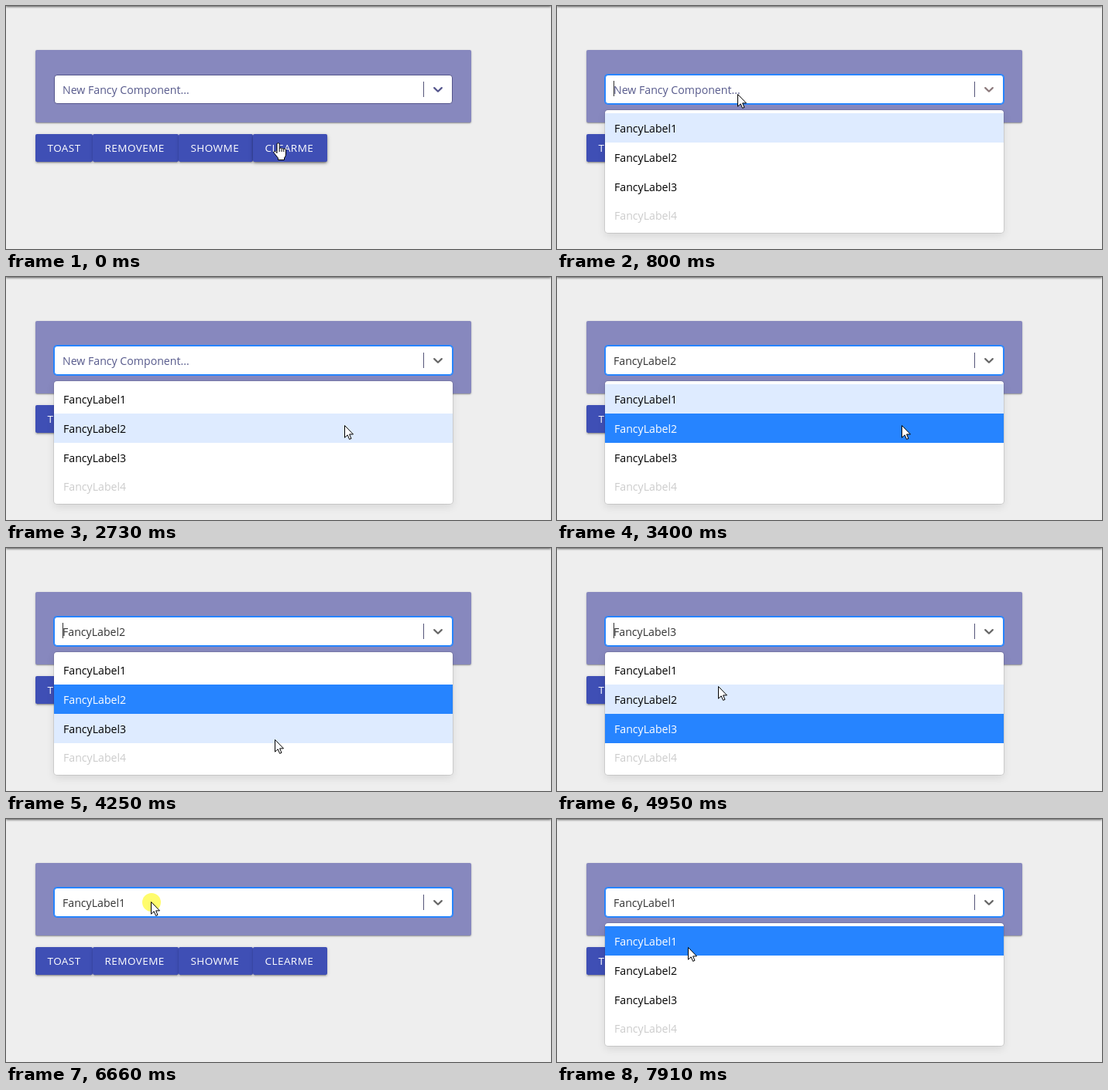
Recreate the animation shown at these times as an HTML page. Size 704 by 315 pixels, loop 7.99 s.

```html
<!DOCTYPE html>
<html lang="en">
<head>
<meta charset="utf-8">
<style>
html, body { margin: 0; width: 100%; height: 100%; overflow: hidden; }
body { position: relative; background: #eee; font: 14.15px "Open Sans", "Noto Sans", sans-serif; }
body > *, #field > * { position: absolute; box-sizing: border-box; white-space: nowrap; }
#bar { left: 0; top: -10px; width: 100%; height: 10px; box-shadow: 0 1px 3px rgba(0,0,0,.65); }
#panel {
  left: 38px; top: 57px; width: 563px; height: 94px; border-radius: 2px; background: #8788be;
  box-shadow: 0 1px 3px rgba(0,0,0,.2), 0 1px 1px rgba(0,0,0,.14), 0 2px 1px -1px rgba(0,0,0,.12);
}
.button {
  top: 166px; height: 36px; padding-left: 15.5px; border-radius: 2px; background: #3f4fb5; color: #fff;
  font-size: 13.5px; line-height: 37px; letter-spacing: .45px;
  box-shadow: 0 3px 1px -2px rgba(0,0,0,.2), 0 2px 2px rgba(0,0,0,.14), 0 1px 5px rgba(0,0,0,.12);
}
.button.hover { box-shadow: 0 2px 3px -1px rgba(0,0,0,.5), 0 2px 4px rgba(0,0,0,.14), 0 1px 6px rgba(0,0,0,.12); }
#field { left: 62px; top: 89px; width: 515px; height: 38px; border: 1px solid #54558c; border-radius: 4px; background: #fff; }
#field.focus { border-color: #2684ff; box-shadow: 0 0 0 1px #2684ff; }
#value { left: 10px; top: 0; line-height: 38px; }
#caret { left: 10px; top: 7px; width: 1px; height: 20px; background: #333; }
#divider { left: 476px; top: 8px; width: 1px; height: 20px; background: #55557a; }
#chevron { left: 485px; top: 8px; fill: none; stroke-width: 2.2; stroke-linecap: round; stroke-linejoin: round; }
#menu {
  left: 62px; top: 135px; width: 515px; height: 159px; padding: 4px 0; border-radius: 4px; background: #fff;
  box-shadow: 0 0 0 1px rgba(0,0,0,.1), 0 4px 11px rgba(0,0,0,.1);
}
.option { height: 38px; padding-left: 12px; line-height: 40px; color: #000; }
.option:last-child { height: 37px; line-height: 38px; color: #ccc; }
.option.near { background: #deebff; }
.option.chosen { background: #2684ff; color: #fff; }
#click { left: 0; top: 0; width: 24px; height: 24px; margin: -12px; border-radius: 50%; background: rgba(255,250,20,.62); }
.cursor { left: 0; top: 0; overflow: visible; fill: #fff; stroke: #000; stroke-linejoin: round; }
#arrow { margin: -1px; }
#hand { margin-left: -6px; }
</style>
</head>
<body>
<div id="bar"></div>
<div id="panel"></div>
<div class="button" style="left:38px;width:74px">TOAST</div>
<div class="button" style="left:112px;width:111px">REMOVEME</div>
<div class="button" style="left:223px;width:96px">SHOWME</div>
<div class="button" style="left:319px;width:96px" id="clear">CLEARME</div>
<div id="field">
  <span id="value"></span>
  <i id="caret"></i>
  <i id="divider"></i>
  <svg id="chevron" width="20" height="20"><path d="M5.2 8.1 10 12.7l4.8-4.6"/></svg>
</div>
<div id="menu">
  <div class="option">FancyLabel1</div>
  <div class="option">FancyLabel2</div>
  <div class="option">FancyLabel3</div>
  <div class="option">FancyLabel4</div>
</div>
<div id="click"></div>
<svg id="arrow" class="cursor" width="13" height="20"><path d="M.5.5V16.2L4.2 12.8 6.6 18.4 9 17.4 6.6 11.9H11.5Z"/></svg>
<svg id="hand" class="cursor" width="18" height="24"><path d="M5 13V2.2a1.6 1.6 0 0 1 3.2 0V8a1.5 1.5 0 0 1 2.9.3a1.5 1.5 0 0 1 2.7.7a1.4 1.4 0 0 1 2.7 1V15q0 3-2 5v2.5H6.5v-2.3L1.2 13.5q-1-2 .6-2.4q1.5 0 3.2 2.4zM8.2 8v4M11.1 8.5V12M13.8 9v3"/></svg>
<script>
const LOOP = 7990, PRESS = 70, BLINK = 530, HOVER_LAG = 80, CHEVRON_FADE = 80;
const MENU_TOP = 135, ROWS_TOP = 139, ROW = 38, BUTTON_TOP = 166;
const $ = id => document.getElementById(id);
const options = [...document.querySelectorAll('.option')];

// Pointer moves: start and end time, then where it comes to rest
const home = [351, 177];
const moves = [
  [0, 570, 234, 115], [2040, 2260, 211, 180], [2260, 2790, 446, 193],
  [3400, 3800, 430, 289], [3800, 4420, 330, 240], [4720, 4950, 209, 180],
  [4950, 5190, 200, 160], [5440, 6080, 188, 108], [7770, 7910, 170, 167]
];
const presses = [720, 3260, 4650, 5340, 6110, 6640];

function pointerAt(t) {
  let [x, y] = home;
  for (const [start, end, toX, toY] of moves) {
    const u = Math.min(1, Math.max(0, (t - start) / (end - start)));
    const eased = u * u * (3 - 2 * u);
    x += (toX - x) * eased;
    y += (toY - y) * eased;
  }
  return [Math.round(x), Math.round(y)];
}

// The last row is disabled, so the highlight stays on the one before it
const rowAt = t => Math.min(2, Math.max(0, Math.floor((pointerAt(t)[1] - ROWS_TOP) / ROW)));

// A press on the open menu picks a row, a press on the field toggles the menu
function stateAt(t) {
  const state = { open: false, pick: -1, picked: -Infinity };
  for (const press of presses) {
    if (t < press + PRESS) break;
    if (pointerAt(press)[1] < MENU_TOP) {
      state.open = !state.open;
    } else {
      state.pick = rowAt(press);
      state.picked = press + PRESS;
    }
  }
  return state;
}

const show = (id, on) => $(id).style.display = on ? '' : 'none';

function draw(t) {
  const [x, y] = pointerAt(t);
  const { open, pick, picked } = stateAt(t);
  const focusAge = t - presses[0] - PRESS, focused = focusAge >= 0;
  const near = t - picked < 200 ? 0 : rowAt(t - HOVER_LAG);
  const overButton = !focused && y >= BUTTON_TOP;

  $('field').classList.toggle('focus', focused);
  $('value').textContent = pick < 0 ? 'New Fancy Component...' : options[pick].textContent;
  $('value').style.color = pick < 0 ? '#575a8c' : '#333';
  $('chevron').style.stroke = !focused ? '#54558c' : focusAge < CHEVRON_FADE ? '#8c7a7c' : '#666';
  show('caret', focused && Math.floor((t - 700) / BLINK) % 2 === 0);

  show('menu', open);
  options.forEach((option, i) => {
    option.classList.toggle('near', i === near);
    option.classList.toggle('chosen', i === pick);
  });

  $('clear').classList.toggle('hover', overButton);
  show('hand', overButton);
  show('arrow', !overButton);
  show('click', presses.some(press => t >= press && t < press + PRESS));
  for (const id of ['hand', 'arrow', 'click']) $(id).style.transform = `translate(${x}px, ${y}px)`;
}

const start = performance.now();
function tick() {
  draw((performance.now() - start) % LOOP);
  requestAnimationFrame(tick);
}
tick();
</script>
</body>
</html>
```
